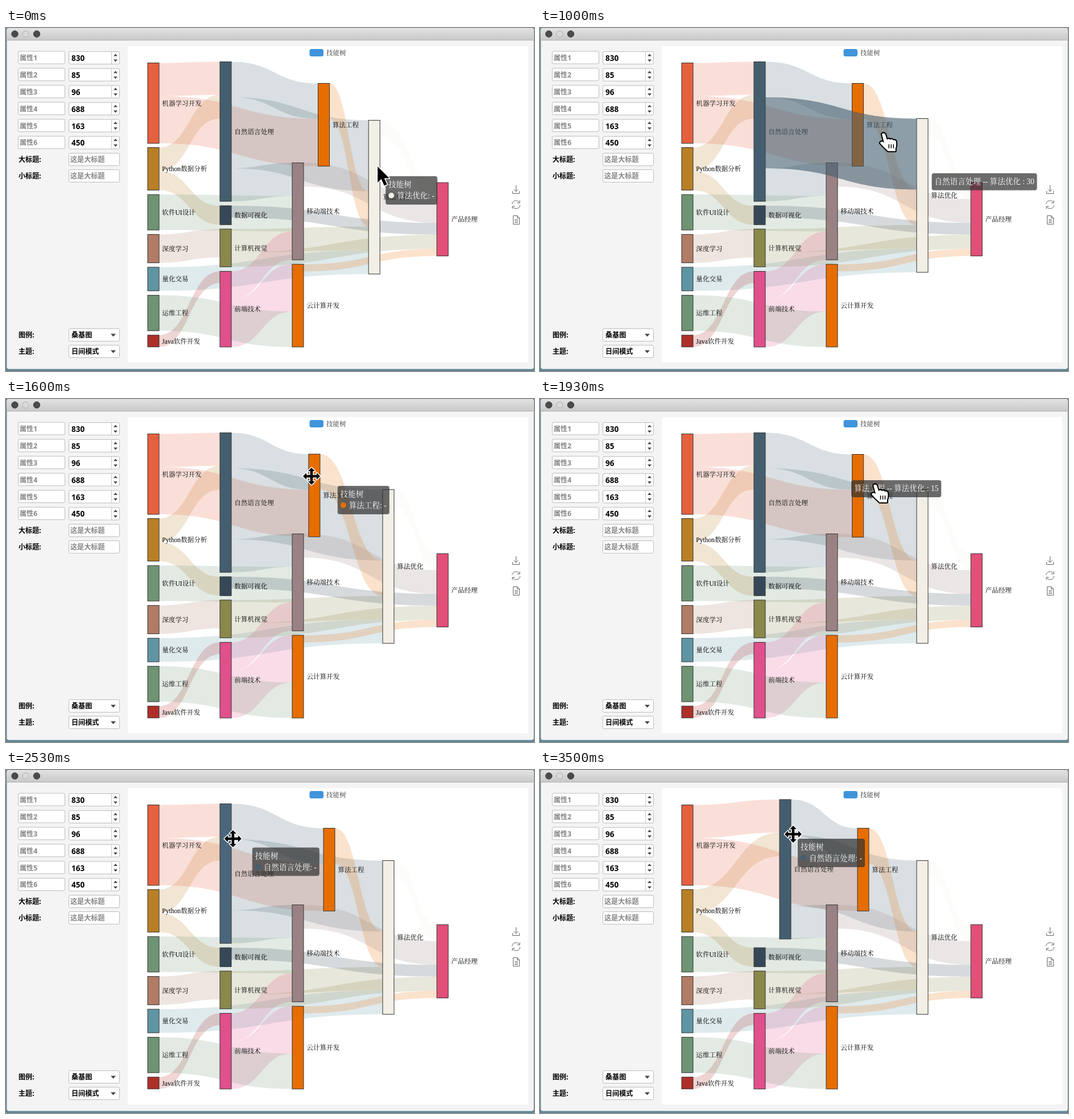
An HTML page that plays this animation: 928 px wide and 604 px high, repeating every 3.53 s.

```html
<!DOCTYPE html>
<html lang="zh">
<head>
<meta charset="utf-8">
<title>技能树</title>
<style>
html, body { margin: 0; width: 100%; height: 100%; overflow: hidden; }
body { position: relative; background: #5f8796; }
svg { position: absolute; left: 0; top: 0; width: 928px; height: 604px; }
svg text, #tip { font-family: "Liberation Serif", "Noto Serif CJK SC", "Noto Sans CJK SC", "Noto Sans CJK", serif; }
svg .ui { font-family: "Open Sans", "Noto Sans CJK SC", "Noto Sans CJK", sans-serif; font-weight: 700; }
#tip {
  position: absolute; left: 0; top: 0; padding: 5px; border-radius: 4px;
  background: rgba(50, 50, 50, .72); color: #fff;
  font-size: 13.55px; line-height: 20.1px; white-space: nowrap;
}
#tip i { display: inline-block; width: 10px; height: 10px; margin-right: 5px; border-radius: 50%; }
#cursors path { stroke-linejoin: round; paint-order: stroke; }
</style>
</head>
<body>
<svg id="stage" viewBox="0 0 928 604">
  <defs>
    <linearGradient id="bar" x2="0" y2="1">
      <stop stop-color="#e2e2e2"/><stop offset="1" stop-color="#c9c9c9"/>
    </linearGradient>
  </defs>
  <rect x="1.5" width="926" height="600.5" rx="4" fill="#f4f4f4"/>
  <path d="M1.5 21V4q0-4 4-4H923q4.500 4.500 4v17z" fill="url(#bar)"/>
  <rect x="1.5" width="926" height="21" rx="3" fill="url(#bar)"/>
  <path d="M1.500 21.500H927.500" stroke="#b2b2b2"/>
  <g stroke-width="1">
    <circle cx="15.500" cy="10.500" r="5.700" fill="#4b4b4b" stroke="#3a3a3a"/>
    <circle cx="34.500" cy="10.500" r="5.500" fill="#d9d9d9" stroke="#adadad"/>
    <circle cx="54" cy="10.500" r="5.700" fill="#4b4b4b" stroke="#3a3a3a"/>
  </g>
  <rect x="214" y="32" width="703.500" height="557" fill="#fff"/>
  <g id="form"></g>
  <rect x="533.500" y="37" width="24.500" height="13" rx="3.500" fill="#4094db"/>
  <text x="563" y="48" font-size="11.600" fill="#333">技能树</text>
  <g fill="none" stroke="#666">
    <path d="M896.500 277V288M892.500 284L896.500 288L900.500 284M890.500 287V291.500H902.500V287"/>
    <path d="M889.500 310A7 7 0 0 1 902.500 307.500M903.500 312A7 7 0 0 1 890.500 314.500M903 303.500V308H898.500M890 318.500V314H894.500"/>
    <path d="M891.500 330.500H898.500L902.500 334.500V345.500H891.500ZM898.500 330.500V334.500H902.500M894 337.500H900M894 340H900M894 342.500H900"/>
  </g>
  <g id="links"></g>
  <g id="nodes"></g>
  <path id="hot" opacity=".6"/>
</svg>
<div id="tip"></div>
<svg id="cursors" viewBox="0 0 928 604">
  <path id="arrow" d="M0 0V28L6.500 22L11.500 33.500L16.500 31.500L11.500 20.500H20.500Z" stroke="#fff" stroke-width="3"/>
  <path id="move" d="M0-15L6-9H2.300V-2.300H9V-6L15 0L9 6V2.300H2.300V9H6L0 15L-6 9H-2.300V2.300H-9V6L-15 0L-9-6V-2.300H-2.300V-9H-6Z" stroke="#fff" stroke-width="3"/>
  <g id="hand">
    <path d="M-3 1Q0-2 3 1L6 11Q9 8 12 11Q15 9 17 12Q21 11 22 14Q23 22 21 26V31H8Q0 24-6 17Q-5 13-1 15L1 16Z" fill="#fff" stroke="#000" stroke-width="4"/>
    <path d="M9.500 19V26M13.500 19V26M17.500 19V26" stroke="#000" stroke-width="1.500"/>
  </g>
</svg>
<script>
const LOOP = 3530, UNIT = 4.164, WIDTH = 20;
const $ = id => document.getElementById(id);

function add(parent, tag, attrs, text) {
  const e = document.createElementNS('http://www.w3.org/2000/svg', tag);
  for (const k in attrs) e.setAttribute(k, attrs[k]);
  if (text) e.textContent = text;
  parent.appendChild(e);
  return e;
}

// Side panel
const form = $('form');
const box = (x, y, w) => add(form, 'rect',
  { x: x + .5, y: y - 11, width: w, height: 22, rx: 2, fill: '#fff', stroke: '#bcbcbc' });
const word = (x, y, text, fill = '#000', size = 12.1) => add(form, 'text',
  { x, y: y + size * .37, fill, 'font-size': size, class: 'ui' }, text);
const shape = d => add(form, 'path', { d, fill: '#444' });

[830, 85, 96, 688, 163, 450].forEach((value, i) => {
  const y = 52.5 + i * 29.9;
  box(21, y - .5, 82);
  word(24, y, '属性' + (i + 1), '#858585');
  box(110, y, 89);
  add(form, 'path', { d: `M185.500 ${y - 11}v22`, stroke: '#c6c6c6' });
  word(115, y + .5, value, '#000', 13.5);
  shape(`M189 ${y - 3}l3.500-4l3.500 4zM189 ${y + 3}l3.500 4l3.500-4z`);
});
[['大标题:', 231.5], ['小标题:', 260.5]].forEach(([name, y]) => {
  word(22, y, name);
  box(110, y, 89);
  word(113, y, '这是大标题', '#858585');
});
[['图例:', '桑基图', 540.5], ['主题:', '日间模式', 569.5]].forEach(([name, value, y]) => {
  word(22, y, name);
  box(110, y, 89);
  word(115, y, value);
  shape(`M184 ${y - 2}h9l-4.500 5z`);
});

// Sankey data: name, colour, x, y
const nodes = {
  ml: ['机器学习开发', '#e5603f', 249, 61.5],
  py: ['Python数据分析', '#b97f26', 249, 210.5],
  ui: ['软件UI设计', '#6e9473', 249, 293.3],
  dl: ['深度学习', '#b07c65', 249, 363.5],
  quant: ['量化交易', '#5f95a3', 249, 421.2],
  ops: ['运维工程', '#6e9473', 249, 470.6],
  java: ['Java软件开发', '#ae2f2a', 249, 540.8],
  nlp: ['自然语言处理', '#445e6f', 376, 59.5],
  viz: ['数据可视化', '#364858', 376, 313],
  cv: ['计算机视觉', '#8a884a', 376, 354],
  web: ['前端技术', '#e0508b', 376, 428.5],
  mob: ['移动端技术', '#9a8284', 503, 237.5],
  cloud: ['云计算开发', '#e66d00', 503, 416],
  eng: ['算法工程', '#e66d00', 548.5, 97.5],
  opt: ['算法优化', '#f1efe6', 662, 159.5],
  pm: ['产品经理', '#e24f78', 757.2, 272.3]
};
const links = `ml nlp 14,py nlp 10,py viz 8,nlp eng 15,ml eng 20,nlp opt 30,nlp mob 14,
ui mob 15,dl cv 12,eng opt 15,cv opt 10,quant opt 10,java web 5,web mob 12,web cloud 20,
ops cloud 15,opt pm 7,mob pm 10,viz pm 5,cv pm 6,cloud pm 3`.split(',').map(s => {
  const [from, to, n] = s.trim().split(' ');
  return { from, to, n: +n };
});

for (const id in nodes) {
  const [name, color, x, y] = nodes[id];
  nodes[id] = { name, color, x, y, out: 0, in: 0 };
}
for (const l of links) {
  const a = nodes[l.from], b = nodes[l.to];
  l.h = l.n * UNIT;
  l.sy = a.out; a.out += l.h;
  l.ty = b.in; b.in += l.h;
  l.path = add($('links'), 'path', { fill: a.color, opacity: .2 });
}
for (const id in nodes) {
  const n = nodes[id];
  n.h = Math.max(n.in, n.out);
  n.rect = add($('nodes'), 'rect', { width: WIDTH, height: n.h, fill: n.color, stroke: '#333' });
}
for (const id in nodes) nodes[id].label = add($('nodes'), 'text', { 'font-size': 11.6 }, nodes[id].name);

function ribbon(l) {
  const a = nodes[l.from], b = nodes[l.to];
  const x1 = a.x + WIDTH, x2 = b.x, mx = (x1 + x2) / 2;
  const y1 = a.y + l.sy, y2 = b.y + l.ty, y3 = y2 + l.h, y4 = y1 + l.h;
  return `M${x1} ${y1}C${mx} ${y1} ${mx} ${y2} ${x2} ${y2}V${y3}C${mx} ${y3} ${mx} ${y4} ${x1} ${y4}Z`;
}

// Motion: "time x y" points
const track = s => s.split(',').map(p => p.trim().split(' ').map(Number));
const drags = {
  opt: track('0 637 162.5,200 675 161,380 698 160,500 694 160,600 685 159.5,750 662 159.5'),
  eng: track('1380 548.5 97.5,1600 532 97,1700 523 97,1800 525 97,1930 548.5 97.5,2060 570 101,2170 570 102,2300 558 102.5'),
  nlp: track('2800 376 59.5,3000 388 60,3200 404 59.5,3500 421 52')
};
const mouse = track(`0 653 244,200 692 247,380 714 247,500 708 247,600 689 247,750 679 243,
880 676 241,1000 604 186,1120 575 145,1250 565 137,1400 560 137,1600 537 136,1700 535 137,
1800 550 143,1930 589 151,2060 592 150,2170 588 146,2300 574 142,2400 550 138,2530 399 121,
2620 390 121,2800 390 121,3000 404 122,3200 425 121,3500 445 113`);
const tipPos = track(`0 667 261,200 700 264,400 729 263,520 730 261,600 720 258,800 699 258,
960 693 258,1000 689 256,1100 640 222,1250 592 163,1400 588 156,1600 583 153,1700 565 153,
1820 549 150,1930 547 143,2060 575 158,2170 600 165,2300 595 162,2430 555 155,2530 433 136.5,
2650 410 137,2800 409 140,3000 416 140,3200 435 138,3500 453 121`);

function at(points, t) {
  const i = points.findIndex(p => p[0] > t);
  if (i < 1) return points[i ? points.length - 1 : 0].slice(1);
  const [t0, x0, y0] = points[i - 1], [t1, x1, y1] = points[i];
  const k = (t - t0) / (t1 - t0);
  return [x0 + (x1 - x0) * k, y0 + (y1 - y0) * k];
}

const tips = [[0, 'opt'], [975, 'nlp', 'opt', 30], [1120, 'eng'], [1900, 'eng', 'opt', 15], [1980, 'eng'], [2470, 'nlp']];
const pointers = [[0, 'arrow'], [70, 'move'], [930, 'hand'], [1100, 'move'], [1890, 'hand'], [1980, 'move'], [2420, 'hand'], [2480, 'move']];
const current = (list, t) => list.filter(s => s[0] <= t).pop();

const tip = $('tip'), hot = $('hot');
const hotLink = links.find(l => l.from === 'nlp' && l.to === 'opt');
hot.setAttribute('fill', nodes.nlp.color);
let shown;

function draw(t) {
  for (const id in drags) [nodes[id].x, nodes[id].y] = at(drags[id], t);
  for (const id in nodes) {
    const { x, y, h, rect, label } = nodes[id];
    rect.setAttribute('x', x);
    rect.setAttribute('y', y);
    label.setAttribute('x', x + WIDTH + 5.3);
    label.setAttribute('y', y + h / 2 + 4.3);
  }
  for (const l of links) l.path.setAttribute('d', ribbon(l));
  nodes.nlp.rect.setAttribute('fill', t > 2490 && t < 2780 ? '#4a667c' : nodes.nlp.color);

  const hover = t >= 970 && t < 1110;
  hotLink.path.style.display = hover ? 'none' : '';
  hot.style.display = hover ? '' : 'none';
  hot.setAttribute('d', ribbon(hotLink));

  const info = current(tips, t);
  if (info !== shown) {
    const [, a, b, n] = shown = info;
    const { name, color } = nodes[a];
    tip.innerHTML = b ? `${name} -- ${nodes[b].name} : ${n}`
      : `技能树<br><i style="background:${color}"></i>${name}: -`;
  }
  const [tx, ty] = at(tipPos, t);
  tip.style.transform = `translate(${tx}px,${ty}px)`;

  const [mx, my] = at(mouse, t), pointer = current(pointers, t)[1];
  for (const id of ['arrow', 'move', 'hand']) {
    $(id).style.display = id === pointer ? '' : 'none';
    $(id).setAttribute('transform', `translate(${mx} ${my})`);
  }
}

const start = performance.now();
function tick() {
  draw((performance.now() - start) % LOOP);
  requestAnimationFrame(tick);
}
tick();
</script>
</body>
</html>
```
